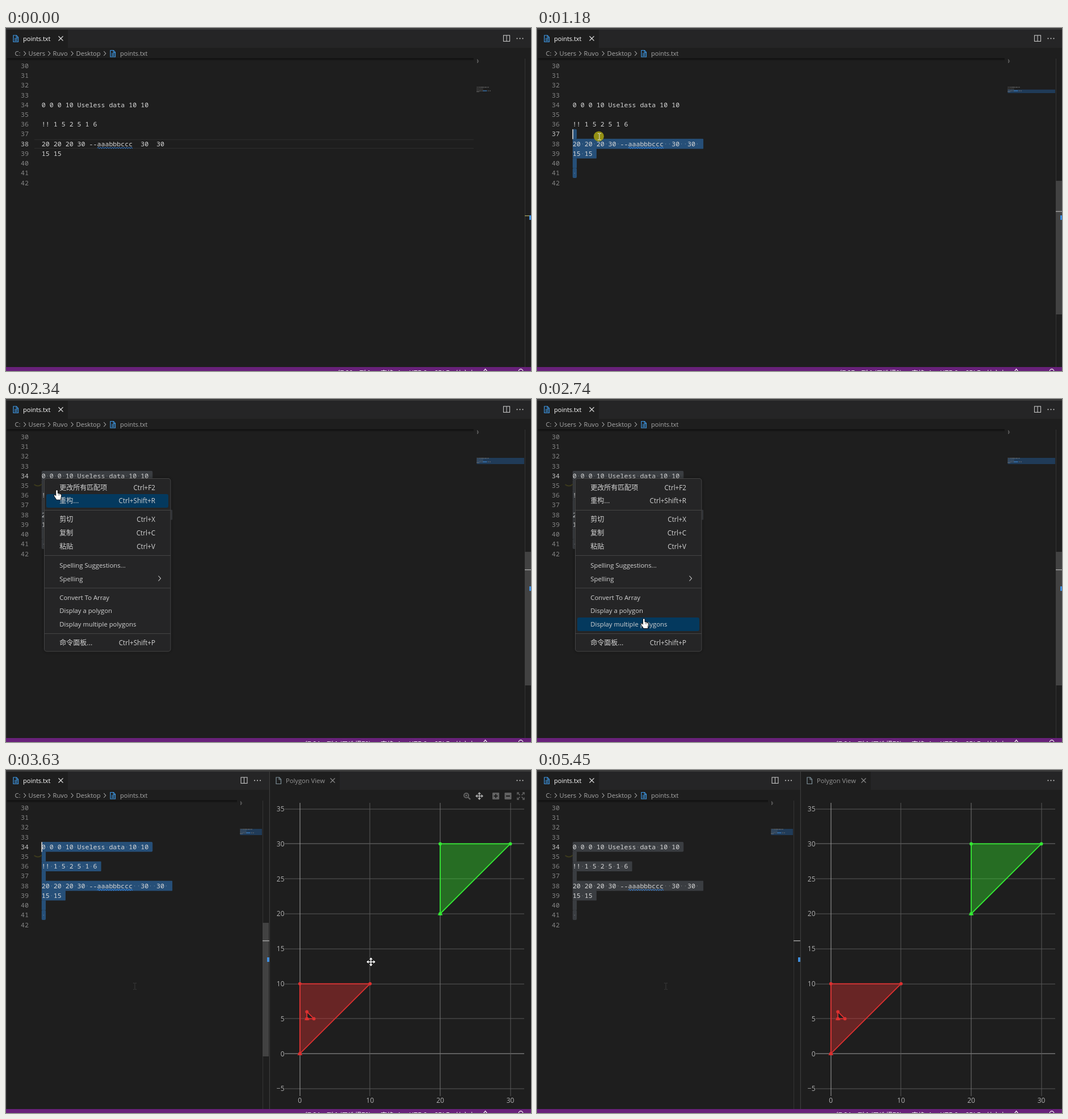
An HTML page with a canvas that plays this animation: 925 px wide and 606 px high, repeating every 5510 ms.

```html
<!DOCTYPE html>
<html lang="en">
<head>
<meta charset="utf-8">
<title>Polygon view</title>
<style>
html, body { margin: 0; width: 100%; height: 100%; overflow: hidden; background: #1e1e1e; }
canvas { display: block; }
</style>
</head>
<body>
<canvas id="stage" width="925" height="606"></canvas>
<script>
const g = document.getElementById('stage').getContext('2d');
const LOOP = 5510, CHAR = 6.97, ROW = 17.22, LEFT = 62.8;
const UI = '"Open Sans", "Noto Sans CJK SC", "Noto Sans CJK", sans-serif';
const CJK = '"Noto Sans CJK SC", "Noto Sans CJK", sans-serif';
const MONO = '"Noto Sans Mono", monospace';
const LINES = {
  34: '0 0 0 10 Useless data 10 10',
  36: '!! 1 5 2 5 1 6',
  38: '20 20 20 30 --aaabbbccc  30  30 ',
  39: '15 15',
  41: ' '
};
const MENU = [
  [156.5, '更改所有匹配项', 'Ctrl+F2'], [180, '重构...', 'Ctrl+Shift+R'],
  [213, '剪切', 'Ctrl+X'], [237, '复制', 'Ctrl+C'], [260.5, '粘贴', 'Ctrl+V'],
  [294, 'Spelling Suggestions...'], [317.5, 'Spelling'],
  [350.5, 'Convert To Array'], [374, 'Display a polygon'], [398, 'Display multiple polygons'],
  [431, '命令面板...', 'Ctrl+Shift+P']
];
// time, x, y
const PATH = [
  [70, 915, 583], [350, 520, 420], [620, 219, 263], [690, 205, 257], [830, 175, 231],
  [1180, 110, 192], [1500, 75, 166], [1730, 56, 143], [1800, 56, 143], [1870, 69, 142],
  [2000, 68, 140], [2140, 70, 143], [2340, 90, 168], [2670, 184, 376], [2740, 189, 396],
  [3080, 189, 396], [3250, 227, 382], [3630, 643, 339], [4040, 643, 339], [4450, 330, 432]
];

const between = (t, a, b) => t >= a && t < b;
const clamp = v => Math.max(0, Math.min(1, v));
const rowY = line => 66.8 + (line - 30) * ROW;

function rect(x, y, w, h, color) {
  g.fillStyle = color;
  g.fillRect(x, y, w, h);
}
function box(x, y, w, h, r, color) {
  g.beginPath();
  g.roundRect(x, y, w, h, r);
  g.fillStyle = color;
  g.fill();
}
function text(s, x, y, color, size = 11.2, font = UI, align = 'left') {
  g.font = size + 'px ' + font;
  g.textAlign = align;
  g.fillStyle = color;
  g.fillText(s, x, y);
}
function line(points, color, width = 1, close = false) {
  g.beginPath();
  points.forEach(([x, y]) => g.lineTo(x, y));
  if (close) g.closePath();
  g.strokeStyle = color;
  g.lineWidth = width;
  g.stroke();
}
function dot(x, y, r, color) {
  g.beginPath();
  g.arc(x, y, r, 0, 7);
  g.fillStyle = color;
  g.fill();
}
const chevron = (x, y, color, s = 3.5) =>
  line([[x - s / 2, y - s - .5], [x + s - s / 2, y], [x - s / 2, y + s + .5]], color, 1.1);

function fileIcon(x, y, color) {
  line([[x + .5, y], [x + 6, y], [x + 9, y + 3.5], [x + 9, y + 11.5], [x + .5, y + 11.5]], color, 1.2, true);
  line([[x + 5.5, y], [x + 5.5, y + 4], [x + 9, y + 4]], color);
}
function blueFile(x, y) {
  fileIcon(x, y, '#3f9bea');
  for (const d of [5.5, 7.5, 9.5]) rect(x + 2.5, y + d - .5, 5, 1, '#3f9bea');
}
function cross(x, y, color) {
  line([[x - 4, y - 4], [x + 4, y + 4]], color, 1.1);
  line([[x - 4, y + 4], [x + 4, y - 4]], color, 1.1);
}
function dots(x) {
  for (const d of [-5, 0, 5]) dot(x + d, 18.5, 1.1, '#c5c5c5');
}

function mouseAt(t) {
  const i = PATH.findIndex(p => p[0] > t);
  if (i < 0) return PATH[PATH.length - 1].slice(1);
  if (!i) return PATH[0].slice(1);
  const [a, x, y] = PATH[i - 1], [b, X, Y] = PATH[i], k = (t - a) / (b - a);
  return [x + (X - x) * k, y + (Y - y) * k];
}

function header(right) {
  rect(0, 3, 925, 32, '#252526');
  rect(0, 0, 925, 3, '#3a3a3a');
  rect(2, 3, 107, 32, '#1e1e1e');
  blueFile(12.5, 13);
  text('points.txt', 30, 23, '#fff', 11);
  cross(96.5, 18.5, '#e0e0e0');
  g.strokeStyle = '#c5c5c5';
  g.lineWidth = 1.1;
  g.strokeRect(right - 48.5, 13, 11, 10.5);
  line([[right - 43, 13], [right - 43, 23.5]], '#c5c5c5', 1.1);
  dots(right - 19.5);
  const gray = '#a9a9a9';
  text('C:', 15.5, 49, gray);
  text('Users', 39.5, 49, gray);
  text('Ruvo', 82.5, 49, gray);
  text('Desktop', 123.5, 49, gray);
  text('points.txt', 201, 49, gray, 11);
  for (const x of [33, 76, 116.5, 174]) chevron(x, 45, gray);
  blueFile(183.5, 39.5);
}

function editor(t, s) {
  const { right, active, selecting, focused } = s;
  const mapX = right === 925 ? 829.5 : 412.5, barX = right - 11;
  const last = mapX - 5.5;

  if (!selecting) {
    rect(50, 196.7, last - 50, 1, '#2e2e2e');
    rect(50, 212, last - 50, 1, '#2e2e2e');
  }
  for (let n = 30; n <= 42; n++) {
    const y = rowY(n), str = LINES[n] || '', on = selecting && n >= active && n <= 41;
    if (on) {
      const w = n === 41 ? CHAR : (str.length + 1) * CHAR;
      box(LEFT, y - 8.7, w + .3, ROW + .3, n === active || n === 41 ? 2 : 1, focused ? '#264f78' : '#3a3d41');
      [...str].forEach((c, i) => {
        if (c === ' ') dot(LEFT + (i + .5) * CHAR, y + .3, .8, 'rgba(227,228,226,.3)');
      });
    }
    text(n, 40, y + 4.1, n === active ? '#c6c6c6' : '#858585', 11.63, MONO, 'right');
    text(str, LEFT, y + 4.1, '#d8d8d8', 11.63, MONO);
  }
  const wave = [];
  for (let x = 161; x <= 223; x += .5) wave.push([x, 211.8 + Math.sin(x * 1.5) * 1.1]);
  line(wave, '#3794ff');

  if (s.caret) rect(62.3, rowY(active) - 8.5, 1.7, 17.5, '#d0d0d0');
  if (t >= 1870) {
    g.beginPath();
    g.arc(56, 144, 9.5, .75, 2.3);
    g.strokeStyle = '#3c3a1c';
    g.lineWidth = 2;
    g.stroke();
  }
  if (t >= 3320) ibeam(227, 382, '#3a3a3a');

  // shadow under the breadcrumb
  const shade = g.createLinearGradient(0, 53.5, 0, 58);
  shade.addColorStop(0, 'rgba(0,0,0,.55)');
  shade.addColorStop(1, 'rgba(0,0,0,0)');
  rect(0, 53.5, last, 5, shade);

  // minimap
  const mapW = barX - 1 - mapX;
  if (selecting) {
    const top = 104 + (active - 34) * 1.6;
    rect(mapX, top, mapW, 115 - top, '#203b58');
    if (active > 38) rect(mapX, 110, mapW, 1.5, '#2f74b5');
  }
  for (const n in LINES) [...LINES[n]].forEach((c, i) => {
    const blue = n === '38' && i > 13 && i < 23;
    const x = mapX + i * .78;
    if (c !== ' ' && x < barX) rect(x, 104 + (n - 34) * 1.6, .78, 1.2, blue ? '#4797e6' : '#7b7b7b');
  });
  line([[mapX + .8, 55.5], [mapX + 3, 58.5], [mapX + .8, 62]], '#777', 1);
  rect(mapX + .5, 55, 1, 7, '#555');

  // overview ruler
  rect(barX, 54, 1, 545, '#343434');
  if (s.bar) rect(barX, 270, 11, 236, '#424242');
  rect(barX, 331 + (active - 38) * 7.5, right - barX + 1, 1.4, selecting ? '#a5a5a5' : '#9b9a5c');
  rect(right - 3, 331, 4, 8, '#3f8fe0');
}

const px = x => 517.8 + x * 12.36, py = y => 501.2 - y * 12.36;

function polygon(rings, color, fill) {
  const pts = rings.map(r => r.map(([x, y]) => [px(x), py(y)]));
  g.beginPath();
  for (const ring of pts) {
    ring.forEach(([x, y], i) => i ? g.lineTo(x, y) : g.moveTo(x, y));
    g.closePath();
  }
  g.fillStyle = fill;
  g.fill('evenodd');
  for (const ring of pts) {
    line(ring, color, 1.8, true);
    ring.forEach(([x, y]) => dot(x, y, 2.9, color));
    const [x, y] = ring[0];
    g.beginPath();
    g.moveTo(x - 4.5, y + 2.5);
    g.lineTo(x + 4.5, y + 2.5);
    g.lineTo(x, y - 4);
    g.fill();
  }
}

function arrows(x, y, r, color) {
  line([[x - r, y], [x + r, y]], color, 1.5);
  line([[x, y - r], [x, y + r]], color, 1.5);
  for (let i = 0; i < 4; i++) {
    g.save();
    g.translate(x, y);
    g.rotate(i * Math.PI / 2);
    g.beginPath();
    g.moveTo(r + 1, 0);
    g.lineTo(r - 2.5, -3);
    g.lineTo(r - 2.5, 3);
    g.fillStyle = color;
    g.fill();
    g.restore();
  }
}

function toolbar() {
  const c = '#626262';
  g.beginPath();
  g.arc(811, 45, 4, 0, 7);
  g.strokeStyle = c;
  g.lineWidth = 2;
  g.stroke();
  dot(811, 45, 1.7, c);
  line([[814, 48], [818, 52]], c, 2.4);
  arrows(834, 46, 6, '#b0b0b0');
  box(857, 40, 12, 12, 1, c);
  box(878.5, 40, 12, 12, 1, c);
  rect(859.5, 45, 7, 2, '#1e1e1e');
  rect(862, 42.5, 2, 7, '#1e1e1e');
  rect(881, 45, 7, 2, '#1e1e1e');
  for (const a of [-1, 1]) for (const b of [-1, 1]) {
    line([[907 + a * 6.2, 46 + b * 2.5], [907 + a * 6.2, 46 + b * 6], [907 + a * 3, 46 + b * 6]], c, 1.3);
    line([[907 + a * 1.5, 46 + b * 1.5], [907 + a * 5.5, 46 + b * 5.5]], c, 1.6);
  }
}

function plotPane(t) {
  rect(463.8, 3, 1.2, 596, '#3c3c3c');
  rect(465, 3, 123, 32, '#1e1e1e');
  fileIcon(475.5, 13, '#7f9099');
  text('Polygon View', 493, 23, '#969696');
  cross(575.5, 18.5, '#8c8c8c');
  dots(905.5);
  if (t < 3350) return;
  for (let y = -5; y <= 35; y += 5) {
    rect(491, Math.round(py(y)) - .4, 422, 1, y === 0 ? '#a0a0a0' : y === 30 ? '#747474' : '#585858');
    text(String(y).replace('-', '−'), 490.5, py(y) + 4.4, '#b0b0b0', 12, UI, 'right');
  }
  for (let x = 0; x <= 30; x += 10) {
    rect(Math.round(px(x)) - .5, 58, 1, 518, x === 0 ? '#a0a0a0' : x === 20 ? '#747474' : '#585858');
    text(x, px(x), 588, '#b0b0b0', 12, UI, 'center');
  }
  polygon([[[0, 0], [0, 10], [10, 10]], [[1, 5], [2, 5], [1, 6]]], '#dc3030', 'rgba(214,48,48,.4)');
  polygon([[[20, 20], [20, 30], [30, 30]]], '#33e833', 'rgba(51,220,45,.42)');
  g.globalAlpha = clamp((t - 3450) / 180) * clamp((4420 - t) / 150);
  toolbar();
  g.globalAlpha = 1;
}

function menu(my) {
  g.shadowColor = 'rgba(0,0,0,.4)';
  g.shadowBlur = 6;
  box(67, 140, 223.5, 306.5, 5, '#454545');
  g.shadowBlur = 0;
  box(68, 141, 221.5, 304.5, 4, '#252526');
  for (const y of [196, 276, 333.5, 414]) rect(68, y, 222, 1, '#454545');
  for (const [y, label, key] of MENU) {
    if (Math.abs(my - y) <= 11.9) box(71, y - 12, 215, 24, 3, '#04395e');
    const latin = label.charCodeAt(0) < 128;
    text(label, 94.3, y + 4.2, '#d4d4d4', latin ? 11.3 : 12, latin ? UI : CJK);
    if (key) text(key, 263, y + 4.2, '#d4d4d4', 11.7, UI, 'right');
  }
  chevron(270.5, 317, '#ccc', 4);
}

function status(active, selecting) {
  rect(0, 599, 925, 7, '#68217a');
  const put = (s, x, align) => text(s, x, 614, '#fff', 11.5, CJK, align);
  const chosen = active === 34 ? '73' : '3';
  put(selecting ? `行 ${active}，列 1 (已选择${chosen})` : `行 ${active}，列 1`, 643, 'right');
  put('空格: 4', 660);
  put('UTF-8', 710);
  put('CRLF', 754);
  put('纯文本', 792);
  line([[841, 607], [844.5, 602.5], [848, 607]], '#fff', 1.2);
  g.beginPath();
  g.arc(907, 606.5, 3.8, Math.PI, 0);
  g.stroke();
}

function ibeam(x, y, color) {
  rect(x - .5, y - 6, 1, 12, color);
  for (const d of [-6, 5.2]) {
    rect(x - 3, y + d, 2.2, 1, color);
    rect(x + .8, y + d, 2.2, 1, color);
  }
}
function hand(x, y) {
  g.save();
  g.translate(x, y);
  const path = new Path2D('M-2-7Q-.7-8.5 .6-7V-2L5-1Q7-.5 7 2L6 7V9H-1L-5 3Q-6 .5-4 1L-2 3Z');
  g.strokeStyle = '#111';
  g.lineWidth = 1.8;
  g.stroke(path);
  g.fillStyle = '#fff';
  g.fill(path);
  for (const d of [2, 4.4]) line([[d, -1], [d, 2]], '#333', .7);
  g.restore();
}

function draw(t) {
  const [mx, my] = mouseAt(t);
  const split = t >= 3150, selecting = t >= 690;
  const active = !selecting ? 38 : t >= 1730 ? 34 :
    Math.max(34, Math.min(41, 30 + Math.round((my - 66.8) / ROW)));
  const menuOpen = between(t, 2140, 3080);
  const focused = !between(t, 2000, 3080) && t < 5450;
  const caret = between(t, 690, 1800) || between(t, 3150, 3770) ||
    between(t, 4240, 4720) || between(t, 5190, 5450);

  rect(0, 0, 925, 606, '#1e1e1e');
  header(split ? 462.5 : 925);
  editor(t, {
    right: split ? 463 : 925, active, selecting, focused, caret,
    bar: between(t, 140, 5450)
  });
  rect(0, 3, 1.5, 596, '#292929');
  if (split) plotPane(t);
  status(active, selecting);
  if (menuOpen) menu(my);

  if (!between(t, 70, 5450)) return;
  if (between(t, 690, 1800) || between(t, 2000, 2140) || between(t, 2810, 2880))
    dot(mx - 1, my - .5, 9, 'rgba(160,155,18,.9)');
  if (menuOpen) hand(mx, my);
  else if (t >= 3350 && mx > 465) {
    arrows(mx, my, 7.5, '#111');
    arrows(mx, my, 6.8, '#fff');
  } else ibeam(mx, my, '#e4e4e4');
}

function tick() {
  draw(performance.now() % LOOP);
  requestAnimationFrame(tick);
}
tick();
</script>
</body>
</html>
```
